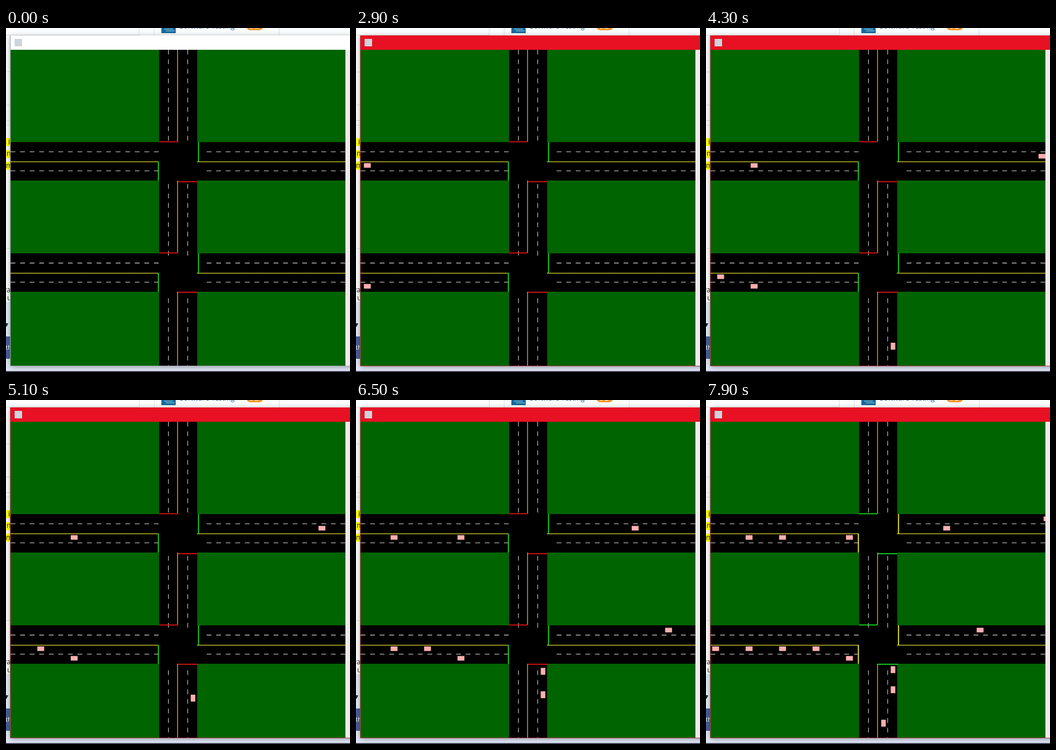
Animation of 600 by 600 pixels, one loop 8 s. Source, as an HTML page:

```html
<!DOCTYPE html>
<html lang="en">
<head>
<meta charset="utf-8">
<title>Traffic simulation</title>
<style>
  html, body { margin: 0; width: 100%; height: 100%; overflow: hidden; background: #fff; }
  svg { display: block; width: 600px; height: 600px; }
  text { font-family: "Open Sans", "Noto Sans", sans-serif; }
  .window { filter: drop-shadow(0 2px 5px rgba(0, 0, 0, .38)); }
</style>
</head>
<body>
<svg viewBox="0 0 600 600">
  <defs><clipPath id="view"><rect x="8" y="38" width="584" height="551"/></clipPath></defs>

  <!-- page behind the window -->
  <rect width="600" height="600" fill="#fcfdfe"/>
  <rect y="478" width="600" height="122" fill="#e1e8f8"/>
  <path d="M232.5 0V13M258.5 0V13M476.5 0V13M0 12.5H232M0 76.5H8M0 134.5H8M0 161.5H8M0 169.5H8M0 384.5H8"
        stroke="#dcdfe2" fill="none"/>
  <rect x="271" width="25" height="9" fill="#176a9b"/>
  <path d="M276 2H291M279 5H294" stroke="#6fb0cf" stroke-width="1.5"/>
  <text x="303" y="1" font-size="12.5" fill="#2f69b0">Software Testing</text>
  <rect x="420" y="-12" width="28" height="16" rx="6" fill="#f5972b"/>
  <path d="M426 .5H430M434 .5H440" stroke="#fff"/>
  <path d="M0 192H8V206H0ZM0 213H8V227H0ZM0 233H8V247H0Z" fill="#ff0"/>
  <g font-size="12" fill="#222">
    <text x="4" y="203">i</text>
    <text x="1" y="223">n</text>
    <text x="0" y="244">m</text>
    <text x="-5" y="461">va</text>
    <text x="2" y="475">u</text>
  </g>
  <path d="M0 515H4L1 521H0Z" fill="#1d2440"/>
  <rect y="538" width="8" height="39" fill="#4a5c9f"/>
  <text x="-1" y="561" font-size="11" fill="#fff">th</text>
  <rect y="598.5" width="600" height="1.5" fill="#2c2a3c"/>

  <!-- window -->
  <rect class="window" x="8" y="13" width="620" height="576" fill="#efebea"/>
  <path id="frame" d="M7.5 13V589.5H600" fill="none"/>
  <rect id="bar" x="8" y="13" width="592" height="25"/>
  <rect x="15" y="19" width="13" height="13" fill="#cdd5dc"/>
  <g clip-path="url(#view)">
    <rect x="8" y="38" width="584" height="551" fill="#006400"/>
    <path d="M267 38H333.5V589H267ZM8 199H592V266H8ZM8 393H592V460H8Z"/>
    <path d="M299.3 38V198M299.3 266V392M299.3 460V589" stroke="#cda62b" stroke-width="1.4"/>
    <path d="M8 233.4H266M333 233.4H592M8 427.6H266M333 427.6H592" stroke="#d6d02c" stroke-width="1.4"/>
    <path id="dashes" stroke="#b0b0b0" stroke-width="1.3" stroke-dasharray="8.33 8.34"/>
    <path id="across" d="M265.7 233V266M335.7 199V233M265.7 427V460M335.7 393V427" stroke-width="1.8"/>
    <path id="upright" d="M267 198.3H299M300 268.2H333.5M267 392.3H299M300 460.8H335" stroke-width="1.8"/>
    <g id="cars" fill="#ffafaf"></g>
  </g>
</svg>
<script>
const LOOP = 8000, FRAME = 100, TICK = 63.2, STEP = 2.917;
const GREEN_AT = 80;
const $ = id => document.getElementById(id);

let d = "";
for (const y of [215.8, 249.2, 410, 443.3]) d += `M8 ${y}H267M350 ${y}H592`;
for (const x of [283.4, 316.8]) d += `M${x} 38V198M${x} 272V398M${x} 471.5V589`;
$("dashes").setAttribute("d", d);

// heading, lane edge, spawn tick, tick of arrival at the queue
const cars = [
  ["east", 235.7, 0], ["east", 235.7, 40], ["east", 235.7, 60],
  ["east", 429.8, 20], ["east", 429.8, 40], ["east", 429.8, 60], ["east", 429.8, 80],
  ["east", 446.5, 0],
  ["west", 219.6, 20], ["west", 203.2, 80], ["west", 397.3, 40],
  ["north", 322.2, 20, 52], ["north", 322.2, 40, 60], ["north", 305.6, 80]
].map(([heading, lane, spawn, halt]) => {
  const el = document.createElementNS("http://www.w3.org/2000/svg", "rect");
  const up = heading === "north";
  el.setAttribute("width", up ? 8 : 12);
  el.setAttribute("height", up ? 12 : 8);
  $("cars").append(el);
  return { el, heading, lane, spawn, halt };
});

function place(car, tick) {
  let n = tick - car.spawn;
  if (car.halt && tick > car.halt) {
    n = car.halt - car.spawn + Math.max(0, tick - GREEN_AT);
  }
  const dist = n * STEP;
  const along = { east: 7.9 + dist, west: 591.7 - dist, north: 560.6 - dist }[car.heading];
  const [x, y] = car.heading === "north" ? [car.lane, along] : [along, car.lane];
  car.el.setAttribute("x", x);
  car.el.setAttribute("y", y);
  car.el.setAttribute("visibility", n > 0 ? "visible" : "hidden");
}

function draw(time) {
  const t = Math.floor(time % LOOP / FRAME) * FRAME;
  const tick = Math.floor((t - 2900) / TICK) + 2;
  const active = t >= 1500, turned = tick >= GREEN_AT;
  $("bar").setAttribute("fill", active ? "#e81123" : "#fff");
  $("frame").setAttribute("stroke", active ? "#b5434f" : "#a9adb4");
  $("across").setAttribute("stroke", turned ? "#f4ee30" : "#16dc22");
  $("upright").setAttribute("stroke", turned ? "#16dc22" : "#e01212");
  for (const car of cars) place(car, tick);
}

const start = performance.now();
function loop() {
  draw(performance.now() - start);
  requestAnimationFrame(loop);
}
loop();
</script>
</body>
</html>
```
